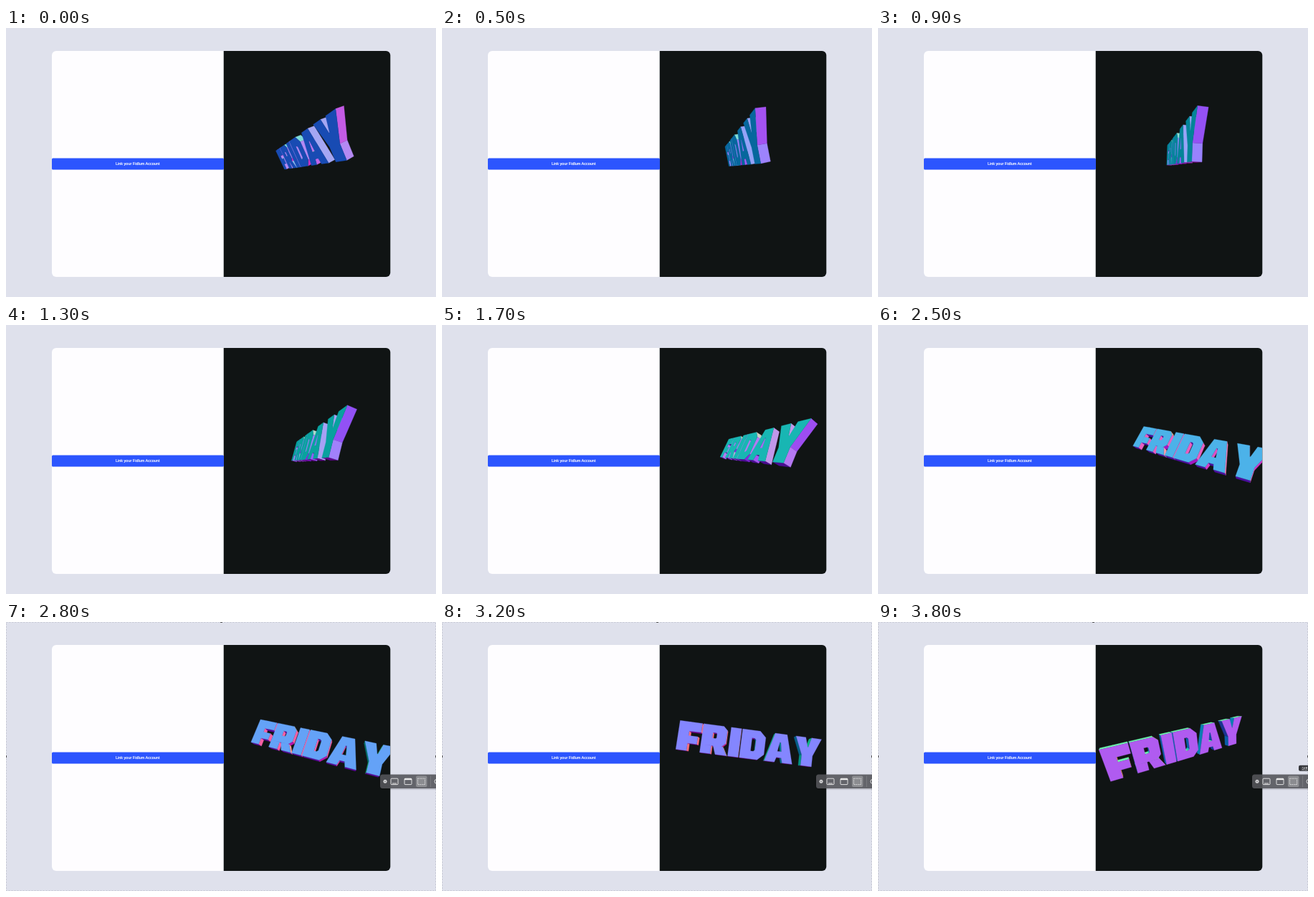
Recreate the animation shown at these times as an HTML page with a canvas. Size 600 px wide and 375 px high, loop 3900 ms.

```html
<!DOCTYPE html>
<html lang="en">
<head>
<meta charset="utf-8">
<title>Friday</title>
<style>
  html, body { margin: 0; width: 600px; height: 375px; overflow: hidden; background: #dfe1ec; }
  svg, canvas { position: absolute; left: 0; top: 0; }
  .label { font: 5.5px Arial, "Liberation Sans", sans-serif; fill: #fff; stroke: #fff; stroke-width: .18; text-anchor: middle; }
  .tip { font: 4.6px "Noto Sans CJK KR", "Noto Sans CJK", sans-serif; fill: #fff; }
</style>
</head>
<body>
<svg width="600" height="375">
  <path d="M303.5 32H530.3a6 6 0 0 1 6 6V341a6 6 0 0 1-6 6H303.5z" fill="#101414"/>
  <path d="M303.5 32H70a6 6 0 0 0-6 6V341a6 6 0 0 0 6 6H303.5z" fill="#fefdff"/>
  <rect x="64" y="181.5" width="240" height="16" rx="1.5" fill="#2c55fe"/>
  <text class="label" x="183.7" y="191.3">Link your Fidlum Account</text>
</svg>
<canvas id="stage" width="600" height="375"></canvas>
<svg id="capture" width="600" height="375" fill="none" stroke="#eee" stroke-width=".9">
  <rect x=".3" y=".3" width="599.4" height="374.4" stroke="#8b8d96" stroke-width=".6" stroke-dasharray="2 2" opacity=".6"/>
  <path d="M299 .5h3M.5 186v3M599.5 186v3" stroke="#555" stroke-width="1"/>
  <g stroke="none">
    <rect x="521" y="213" width="90" height="21" rx="4" fill="#000" opacity=".13"/>
    <rect x="522" y="212.5" width="90" height="19.5" rx="3.5" fill="#56575b" opacity=".87"/>
    <rect x="572" y="214.5" width="15.5" height="15.5" rx="2" fill="#8b8c90"/>
    <circle cx="529" cy="222.3" r="2.5" fill="#d8d8da"/>
  </g>
  <path d="M528.1 221.4l1.8 1.8m0-1.8l-1.8 1.8" stroke="#55565a" stroke-width=".6"/>
  <rect x="537" y="218.2" width="10" height="8.4" rx="1"/>
  <path d="M539 225h6"/>
  <rect x="556" y="218.2" width="10" height="8.4" rx="1"/>
  <path d="M556 219.2h10" stroke-width="2"/>
  <rect x="574.6" y="218.2" width="10" height="8.4" stroke-dasharray="1.4 1"/>
  <path d="M592.5 214.5v15.5" stroke="#85868a" stroke-width=".6"/>
  <circle cx="601" cy="222.3" r="3"/>
  <g id="tip" stroke="none">
    <rect x="587" y="199.8" width="30" height="8" rx="2" fill="#35363b"/>
    <text class="tip" x="591" y="205.5">화면</text>
  </g>
</svg>
<script>
const LOOP = 3900, STEP = 100;
const FOCAL = 205.3, DISTANCE = 5, CENTER = [420.5, 190];
const CAP = 0.95, DEPTH = 0.2, GAP = 0.04, STEM = 0.34;
const SPIN_RATE = 0.6, FACING_TIME = 3.46, YAW = 0.19;

// Contours run counter-clockwise, holes clockwise; letters are one unit high.
const slab = (x, y, w, h, cut = 0) => cut
  ? [[x, y], [x + w - cut, y], [x + w, y + cut], [x + w, y + h - cut], [x + w - cut, y + h], [x, y + h]]
  : [[x, y], [x + w, y], [x + w, y + h], [x, y + h]];
const hole = contour => [...contour].reverse();
const mirror = (mid, half) => [
  ...half.map(([x, y]) => [mid + x, y]),
  ...hole(half).map(([x, y]) => [mid - x, y]),
];

const GLYPHS = {
  F: [slab(0, 0, STEM, 1), slab(STEM, .26, .3, .26), slab(STEM, .68, .39, .32)],
  R: [slab(0, 0, STEM, .28), slab(0, .28, .8, .72, .13), hole(slab(STEM, .54, .14, .2, .03)),
      [[.4, .28], [.5, 0], [.87, 0], [.72, .28]]],
  I: [slab(0, 0, STEM, 1)],
  D: [slab(0, 0, .79, 1, .2), hole(slab(STEM, .27, .14, .46, .05))],
  A: [mirror(.46, [[.08, .17], [.13, 0], [.46, 0], [.2, 1]]), hole(mirror(.46, [[.07, .38], [.02, .7]]))],
  Y: [mirror(.43, [[.18, 0], [.18, .37], [.43, 1], [.1, 1], [.01, .66]])],
};

function layOut(text) {
  let pen = 0;
  const letters = [...text].map(ch => {
    const start = pen, contours = GLYPHS[ch];
    pen += Math.max(...contours.flat().map(p => p[0])) + GAP;
    return contours.map(c => c.map(([x, y]) => [start + x, y * CAP]));
  });
  const shift = 0.15 - (pen - GAP) / 2;
  return letters.map(l => l.map(c => c.map(([x, y]) => [x + shift, y])));
}

const word = layOut('FRIDAY');
const ctx = document.getElementById('stage').getContext('2d');
const capture = document.getElementById('capture');
const tip = document.getElementById('tip');

const turn = (u, v, a) => [u * Math.cos(a) - v * Math.sin(a), u * Math.sin(a) + v * Math.cos(a)];

function rotateX([x, y, z], a) { [y, z] = turn(y, z, a); return [x, y, z]; }
function rotateY([x, y, z], a) { [z, x] = turn(z, x, a); return [x, y, z]; }
function rotateZ([x, y, z], a) { [x, y] = turn(x, y, a); return [x, y, z]; }

function smooth(k) {
  k = Math.min(1, Math.max(0, k));
  return k * k * (3 - 2 * k);
}

function project([x, y, z]) {
  const s = FOCAL / (DISTANCE - z);
  return [CENTER[0] + x * s, CENTER[1] - y * s];
}

// Colour shows the surface normal: x, y, z become red, green, blue.
function fillShape(contours, normal) {
  ctx.beginPath();
  for (const [first, ...rest] of contours) {
    ctx.moveTo(...project(first));
    rest.forEach(p => ctx.lineTo(...project(p)));
    ctx.closePath();
  }
  ctx.fillStyle = ctx.strokeStyle = `rgb(${normal.map(v => Math.round(127.5 + 127.5 * v))})`;
  ctx.fill('evenodd');
  ctx.stroke();
}

function drawWord(seconds) {
  const spin = SPIN_RATE * (seconds - FACING_TIME);
  const pitch = -0.02 + 0.12 * smooth((seconds - 1.3) / 1.7);
  const rotate = v => rotateX(rotateY(rotateX(rotateY(rotateZ(v, spin), spin), spin), YAW), pitch);
  const walls = [];
  for (const contour of word.flat()) {
    contour.forEach(([x0, y0], i) => {
      const [x1, y1] = contour[(i + 1) % contour.length];
      const length = Math.hypot(x1 - x0, y1 - y0);
      const normal = rotate([(y1 - y0) / length, (x0 - x1) / length, 0]);
      const quad = [[x0, y0, 0], [x1, y1, 0], [x1, y1, DEPTH], [x0, y0, DEPTH]].map(rotate);
      const mid = [0, 1, 2].map(j => (quad[0][j] + quad[2][j]) / 2);
      const toEye = [-mid[0], -mid[1], DISTANCE - mid[2]];
      const facing = toEye.reduce((sum, v, j) => sum + v * normal[j], 0);
      if (facing > 0) walls.push({ quad, normal, far: Math.hypot(...toEye) });
    });
  }
  walls.sort((a, b) => b.far - a.far).forEach(w => fillShape([w.quad], w.normal));
  // The faces share one plane in front of every wall.
  const front = rotate([0, 0, 1]);
  for (const letter of word) {
    fillShape(letter.map(c => c.map(([x, y]) => rotate([x, y, DEPTH]))), front);
  }
}

ctx.beginPath();
ctx.rect(304, 32, 232, 315);
ctx.clip();
ctx.lineWidth = 0.3;
ctx.lineJoin = 'round';

function frame(now) {
  const t = Math.floor(now % LOOP / STEP) * STEP;
  ctx.clearRect(0, 0, 600, 375);
  drawWord(t / 1000);
  capture.style.display = t >= 2600 ? '' : 'none';
  tip.style.display = t >= 3700 ? '' : 'none';
  requestAnimationFrame(frame);
}
frame(0);
</script>
</body>
</html>
```
